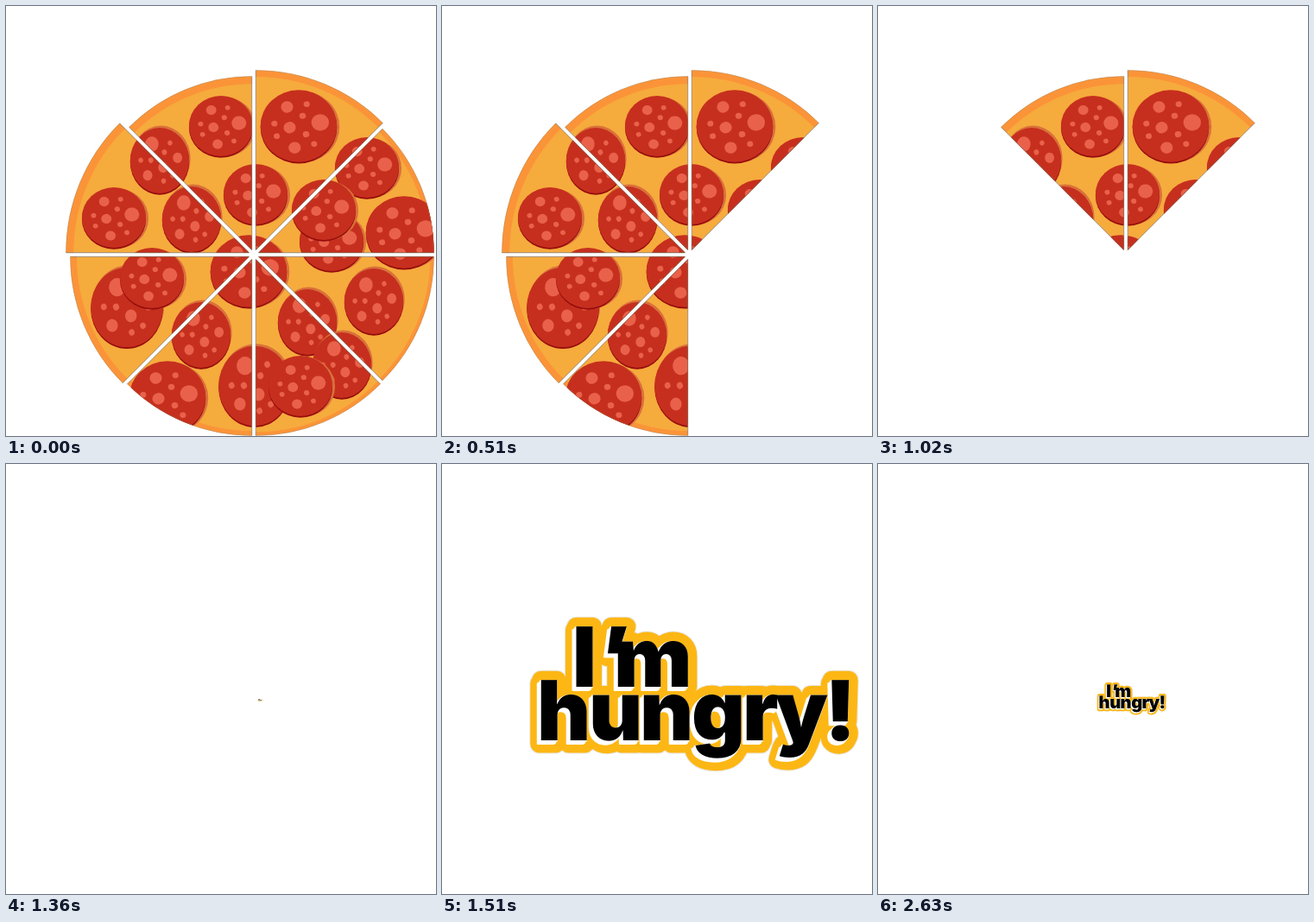
These frames come from a looping animation (498 by 498 pixels, 2.66 s). An HTML page:

```html
<!DOCTYPE html>
<html lang="en">
<head>
<meta charset="utf-8">
<title>I’m hungry!</title>
<style>
  html, body { margin: 0; width: 100%; height: 100%; overflow: hidden; background: #fff; }
  svg { display: block; width: 498px; height: 498px; }
  text {
    font: 900 96px Inter, Roboto, sans-serif;
    font-optical-sizing: none;
    text-rendering: geometricPrecision;
  }
</style>
</head>
<body>
<svg viewBox="0 0 498 498">
  <defs>
    <g id="toppings"></g>
    <g id="words">
      <text y="258" x="151 184 199">I’m</text>
      <text y="320" x="110 170 229 289 348 386 443">hungry!</text>
    </g>
  </defs>
  <g id="pizza"></g>
  <g id="slogan" stroke-linejoin="round">
    <g fill="#e9e6df" stroke="#e9e6df" stroke-width="23">
      <use href="#words"/>
      <use href="#words" x="-2" y="4"/>
    </g>
    <g fill="#fdb714" stroke="#fdb714" stroke-width="21">
      <use href="#words"/>
      <use href="#words" x="-2" y="4"/>
    </g>
    <g fill="#fff" stroke="#fff" stroke-width="2">
      <use href="#words" x="-1" y="1"/>
      <use href="#words" x="-2.5" y="2.5"/>
      <use href="#words" x="-4" y="4"/>
    </g>
    <use href="#words"/>
  </g>
</svg>
<script>
const LOOP = 2660, BITE = 170, TICK = 30;
const GROW_AT = 1360, SHRINK_AT = 2540, SCALE_STEP = 0.1974;
const PIVOT = { x: 294.3, y: 273.2 };
const CENTRE = [287, 288], PUSH = 6;

// The slices are cut a little unevenly; clockwise from the right-hand upper one
const RADII = [203, 203, 204, 204, 207, 212, 201, 208];

// Pepperoni centres, grouped by shape, lowest layer first
const LAYERS = [
  { tall: true, size: 44, at: [[288, 440], [140, 349]] },
  { tall: true, size: 36, at: [[178, 179], [215, 247], [426, 342], [349, 366], [389, 416], [226, 381]] },
  { tall: false, size: 43, at: [[339, 139], [461, 262], [281, 307], [187, 453]] },
  { tall: false, size: 36, at: [[249, 139], [125, 245], [289, 218], [418, 187], [377, 272], [368, 236], [341, 440], [169, 315]] }
];

const $ = id => document.getElementById(id);
const polar = ([x, y], r, deg) => {
  const a = deg * Math.PI / 180;
  return [x + r * Math.cos(a), y + r * Math.sin(a)];
};

// Spots on a unit disc, mirrored about the axis through the largest one
function spots() {
  const spot = (dist, deg, r) => {
    const [x, y] = polar([0, 0], dist, deg);
    return `<circle cx="${x}" cy="${y}" r="${r}"/>`;
  };
  const pair = (dist, deg, r) => spot(dist, deg, r) + spot(dist, -deg, r);
  return spot(.57, 0, .23) + spot(.24, 180, .16) + pair(.61, 110, .16) +
    pair(.64, 61, .08) + pair(.3, 60, .085) + pair(.64, 164, .08);
}

function pepperoni([x, y], { tall, size }) {
  const stretch = tall ? .95 : 1.03;
  const rx = size * stretch, ry = size / stretch;
  const disc = (dx, dy, fill) =>
    `<ellipse cx="${x + dx}" cy="${y + dy}" rx="${rx}" ry="${ry}" fill="${fill}"/>`;
  const halo = tall ? disc(1.5, -2.5, '#d9713a') : disc(3, 1, '#d9713a');
  return halo + disc(0, 1.8, '#960c0c') + disc(0, 0, '#c62f1e') +
    `<g fill="#e9614a" transform="translate(${x} ${y}) scale(${rx} ${ry}) rotate(${tall ? -118 : -10})">${spots()}</g>`;
}

function slice(r, i) {
  const start = 45 * (i - 1), middle = start + 22.5;
  const tip = polar(CENTRE, PUSH, middle);
  const from = polar(tip, r, start), to = polar(tip, r, start + 45);
  const arc = `A${r} ${r} 0 0 1 ${to}`;
  const outline = `M${tip}L${from}${arc}Z`;
  // The crust is thickest at the upper left
  const crust = 6.5 - 2.5 * Math.cos((middle - 45) * Math.PI / 180);
  return `<g>
    <clipPath id="cut${i}"><path d="${outline}"/></clipPath>
    <g clip-path="url(#cut${i})">
      <path d="${outline}" fill="#f6ab3d"/>
      <path d="M${from}${arc}" fill="none" stroke="#fb9438" stroke-width="${crust * 2}"/>
      <use href="#toppings"/>
    </g>
    <path d="M${from}L${tip}L${to}" fill="none" stroke="#80705c" stroke-opacity=".75"/>
    <path d="M${from}${arc}" fill="none" stroke="#a08468" stroke-width=".7" stroke-opacity=".6"/>
  </g>`;
}

$('toppings').innerHTML = LAYERS
  .flatMap(layer => layer.at.map(point => pepperoni(point, layer)))
  .join('');
$('pizza').innerHTML = RADII.map(slice).join('');
const pieces = [...$('pizza').children];

function sloganScale(t) {
  if (t < GROW_AT) return 0;
  const ticks = t < SHRINK_AT
    ? Math.max(0, 5 - Math.floor((t - GROW_AT) / TICK))
    : Math.floor((t - SHRINK_AT) / TICK) + 1;
  return 1 - SCALE_STEP * ticks;
}

function render(t) {
  pieces.forEach((piece, i) => {
    piece.style.display = t < BITE * (i + 1) ? '' : 'none';
  });
  const s = sloganScale(t);
  $('slogan').style.display = s ? '' : 'none';
  $('slogan').setAttribute('transform',
    `translate(${PIVOT.x} ${PIVOT.y}) scale(${s}) translate(${-PIVOT.x} ${-PIVOT.y})`);
}

const start = performance.now();
function frame() {
  render((performance.now() - start) % LOOP);
  requestAnimationFrame(frame);
}
frame();
</script>
</body>
</html>
```
